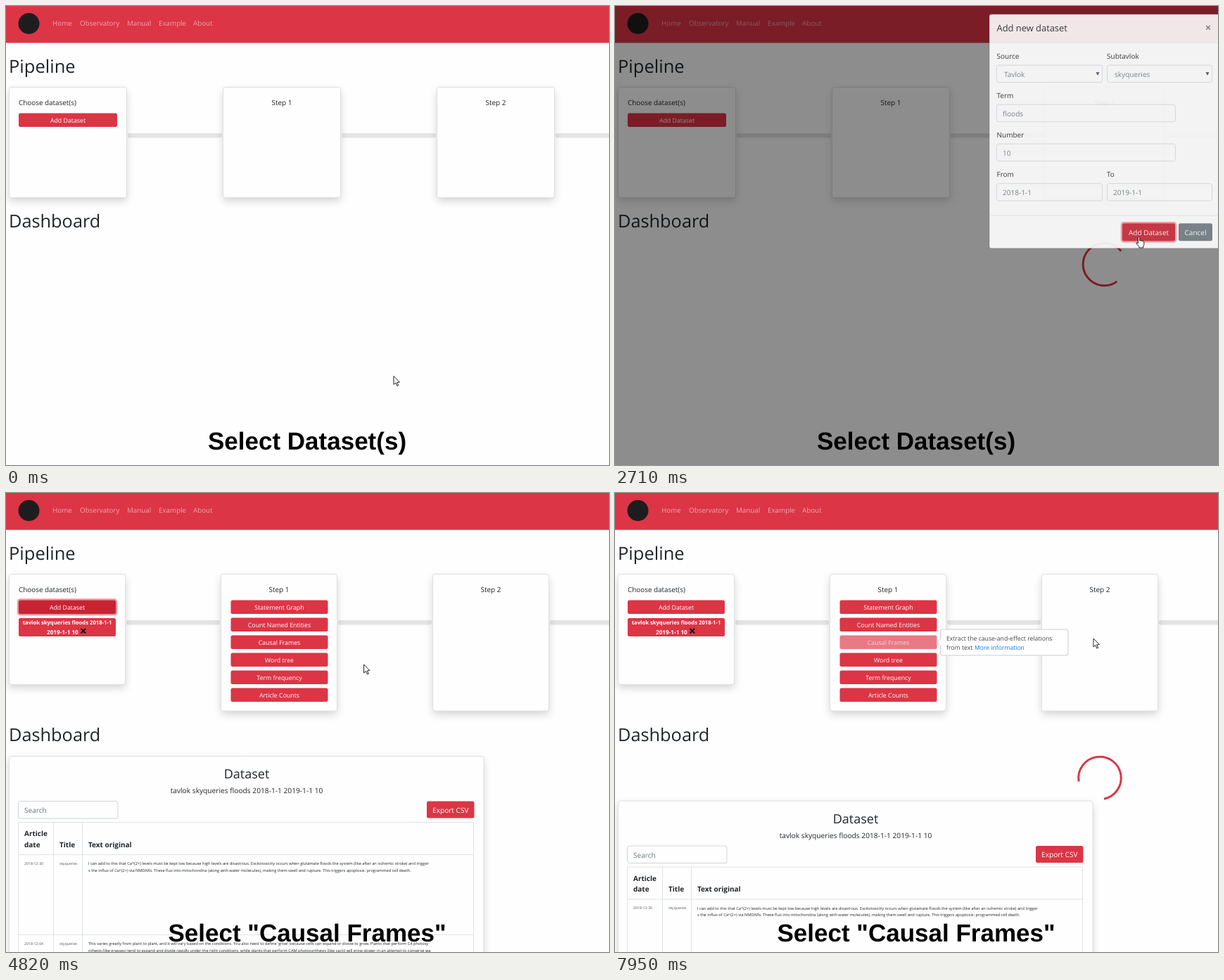
Animation, 857 px wide and 653 px high, one loop 8000 ms. Source, as an HTML page with a canvas:

```html
<!DOCTYPE html>
<html lang="en">
<head>
<meta charset="utf-8">
<title>Pipeline demo</title>
<style>
  html, body { margin: 0; width: 100%; height: 100%; overflow: hidden; background: #fefefe; }
  canvas { display: block; }
</style>
</head>
<body>
<canvas id="stage" width="857" height="653"></canvas>
<script>
const ctx = document.getElementById('stage').getContext('2d');
ctx.textRendering = 'geometricPrecision';

const LOOP = 8000;
const RED = '#dc3545', DARK_RED = '#c02231', INK = '#212529', GREY = '#6c757d', LINE = '#dee2e6';
const SANS = '"Open Sans", "Noto Sans", sans-serif';
const QUERY = 'tavlok skyqueries floods 2018-1-1';

// Moments of the story, in ms
const BACKDROP_IN = 1290, MODAL_IN = 1460, SUBMIT = 2570, MODAL_OUT = 2695;
const LOADED = 3850, NEXT_CAPTION = 4510, POPOVER = 5130;
const RUN_CLICK = 5830, ALERT_IN = 5880, ALERT_OUT = 7290, RUNNING = 7330;

const progress = (t, start, length) => Math.min(1, Math.max(0, (t - start) / length));
const smooth = u => u * u * (3 - 2 * u);
const easeOut = u => 1 - (1 - u) ** 2;

function text(str, x, y, size, color = INK, align = 'left', weight = 400, family = SANS) {
  ctx.font = `${weight} ${size}px ${family}`;
  ctx.fillStyle = color;
  ctx.textAlign = align;
  ctx.fillText(str, x, y);
}

function box(x, y, w, h, { fill, stroke, r = 3, shadow = 0, lineWidth = 1 } = {}) {
  ctx.save();
  ctx.beginPath();
  ctx.roundRect(x, y, w, h, r);
  if (shadow) {
    ctx.shadowColor = `rgba(0,0,0,${shadow})`;
    ctx.shadowBlur = 12;
    ctx.shadowOffsetY = 5;
  }
  if (fill) { ctx.fillStyle = fill; ctx.fill(); }
  ctx.shadowColor = 'transparent';
  if (stroke) { ctx.strokeStyle = stroke; ctx.lineWidth = lineWidth; ctx.stroke(); }
  ctx.restore();
}

function line(x1, y1, x2, y2, color = LINE, width = 1) {
  ctx.beginPath();
  ctx.moveTo(x1, y1);
  ctx.lineTo(x2, y2);
  ctx.strokeStyle = color;
  ctx.lineWidth = width;
  ctx.stroke();
}

function button(label, x, y, w, h, size, { fill = RED, focus = false } = {}) {
  if (focus) box(x - 1, y - 1, w + 2, h + 2, { stroke: 'rgba(220,53,69,.5)', lineWidth: 2.5 });
  box(x, y, w, h, { fill, r: 2.5 });
  text(label, x + w / 2, y + h / 2 + size * .4, size, '#fff', 'center');
}

const card = (x, y, w, h) => box(x, y, w, h, { fill: '#fefefe', stroke: '#dfdfdf', shadow: .17 });

function spinner(x, y, gapCentre) {
  ctx.beginPath();
  ctx.arc(x, y, 30.3, (gapCentre + 46) * Math.PI / 180, (gapCentre + 314) * Math.PI / 180);
  ctx.strokeStyle = RED;
  ctx.lineWidth = 3;
  ctx.stroke();
}

function navbar() {
  ctx.fillStyle = RED;
  ctx.fillRect(0, 0, 857, 52.5);
  ctx.beginPath();
  ctx.arc(32.5, 25, 15, 0, 7);
  ctx.fillStyle = '#1d1d1f';
  ctx.fill();
  const links = { Home: 66, Observatory: 105, Manual: 172, Example: 217, About: 266 };
  for (const name in links) text(name, links[name], 28, 9.8, 'rgba(255,255,255,.55)');
}

function pipeline(t) {
  const loaded = t >= LOADED;
  const pitch = loaded ? 301 : 304, width = loaded ? 165 : 167, inner = width - 27;
  text('Pipeline', 4, 95, 25.5);
  for (let i = 0; i < 3; i++) {
    const x = 4.5 + i * pitch;
    box(x + width + 1.5, 181, pitch - width - 3, 6.5, { fill: '#e4e4e4', r: 2 });
    card(x, 115.5, width, loaded && i ? 194.5 : 157);
    if (i) text('Step ' + i, x + width / 2, 141, 10, INK, 'center');
  }
  text('Choose dataset(s)', 18, 141, 9.9);
  const hover = t > 930 && t < BACKDROP_IN;
  const focus = loaded && t < RUN_CLICK;
  button('Add Dataset', 18, 152.5, inner, 19.5, 8.8, { fill: hover || focus ? '#c82333' : RED, focus });
  if (!loaded) return;

  box(18, 178, inner, 26, { fill: RED, r: 2.5 });
  text(QUERY, 87, 186.5, 7.7, '#fff', 'center', 700);
  text('2019-1-1 10', 58, 201, 8.2, '#fff', 'left', 700);
  line(106.5, 193, 113, 199.5, '#000', 1.8);
  line(113, 193, 106.5, 199.5, '#000', 1.8);

  const steps = ['Statement Graph', 'Count Named Entities', 'Causal Frames', 'Word tree', 'Term frequency', 'Article Counts'];
  steps.forEach((label, i) => {
    const chosen = i === 2 && t < RUNNING;
    const focus = chosen && t >= RUN_CLICK;
    const fill = focus ? DARK_RED : chosen && t > 4960 ? '#c82333' : RED;
    if (i === 2 && t >= RUNNING) ctx.globalAlpha = .65;
    button(label, 319.5, 152.5 + i * 25, inner, 19.5, 8.8, { fill, focus });
    ctx.globalAlpha = 1;
  });
}

function tableRow(y, date, lines) {
  text(date, 26, y - .5, 5.2, '#555');
  text('skyqueries', 76, y - .5, 5.1, '#555');
  lines.forEach((s, i) => text(s, 117, y + i * 9.7, 5.65));
}

function datasetCard() {
  card(4.5, 374.5, 674.5, 400);
  text('Dataset', 342, 406, 18, INK, 'center', 500);
  text(QUERY + ' 2019-1-1 10', 342, 427, 10.2, INK, 'center');
  box(17.5, 438.5, 141.5, 24.5, { stroke: '#ced4da' });
  text('Search', 26, 455, 10.1, GREY);
  button('Export CSV', 598, 438.5, 67.5, 24, 10.1);

  for (const x of [17.5, 67.5, 108.5, 664.5]) line(x, 468.5, x, 760);
  for (const y of [468.5, 514.5, 628.5]) line(17.5, y, 664.5, y);
  text('Article', 26, 488, 10, INK, 'left', 700);
  text('date', 26, 503.5, 10, INK, 'left', 700);
  text('Title', 76, 503.5, 10, INK, 'left', 700);
  text('Text original', 117, 503.5, 10, INK, 'left', 700);
  tableRow(529, '2018-12-30', [
    'I can add to this that Ca^(2+) levels must be kept low because high levels are disastrous. Excitotoxicity occurs when glutamate floods the system (like after an ischemic stroke) and trigger',
    's the influx of Ca^(2+) via NMDARs. These flux into mitochondria (along with water molecules), making them swell and rupture. This triggers apoptosis: programmed cell death.']);
  tableRow(643, '2018-12-04', [
    "This varies greatly from plant to plant, and it will vary based on the conditions. You also need to define 'grow' because cells can expand or divide to grow. Plants that perform C4 photosy",
    'nthesis (like grasses) tend to expand and divide rapidly under the right conditions, while plants that perform CAM photosynthesis (like cacti) will grow slower in an attempt to conserve wa']);
}

function dashboard(t) {
  const loaded = t >= LOADED;
  text('Dashboard', 4, loaded ? 352.5 : 315, 25.3);
  if (!loaded && t >= 2640) spinner(695.5, 367.5, 97 + (t - 2860) * .6);
  if (t >= RUNNING) spinner(689, 405.5, 124 + (t - 7950) * .6);
  if (!loaded) return;
  ctx.save();
  if (t >= RUNNING) ctx.translate(0, 63.5);
  datasetCard();
  ctx.restore();
}

function popover(t) {
  ctx.globalAlpha = progress(t, POPOVER, 150);
  box(462.5, 194, 181.5, 37, { fill: '#fff', stroke: '#ccc' });
  ctx.beginPath();
  ctx.moveTo(463, 207);
  ctx.lineTo(457.5, 212.5);
  ctx.lineTo(463, 218);
  ctx.fillStyle = '#fff';
  ctx.fill();
  ctx.strokeStyle = '#ccc';
  ctx.lineWidth = 1;
  ctx.stroke();
  text('Extract the cause-and-effect relations', 471, 209.5, 8.7, '#444');
  text('from text', 471, 223, 8.7, '#444');
  text('More information', 511, 223, 8.6, '#007bff');
  ctx.globalAlpha = 1;
}

function field(value, x, y, w, isSelect) {
  box(x, y, w, 24.5, { stroke: '#ced4da' });
  text(value, x + (isSelect ? 10.5 : 8.5), y + 16.5, 10.1, GREY);
  if (!isSelect) return;
  ctx.beginPath();
  ctx.moveTo(x + w - 9, y + 10);
  ctx.lineTo(x + w - 4, y + 10);
  ctx.lineTo(x + w - 6.5, y + 14.5);
  ctx.fillStyle = '#444';
  ctx.fill();
}

function modal(t) {
  const closing = progress(t, MODAL_OUT, 150);
  ctx.fillStyle = `rgba(0,0,0,${.5 * progress(t, BACKDROP_IN, 150) * (1 - closing)})`;
  ctx.fillRect(0, 0, 857, 653);

  ctx.save();
  ctx.globalAlpha = progress(t, MODAL_IN, 150) * (1 - closing);
  ctx.translate(0, -50 * (1 - easeOut(progress(t, 1385, 350))) - 50 * easeOut(progress(t, 2710, 300)));
  box(532, 12, 330, 333, { fill: '#fff', stroke: 'rgba(0,0,0,.2)' });
  text('Add new dataset', 542.5, 36, 12.9, INK, 'left', 500);
  text('×', 843, 36, 15, '#777', 'center', 700);
  line(532, 52.5, 857, 52.5);
  line(532, 298.5, 857, 298.5);

  text('Source', 542.5, 75, 10);
  text('Subtavlok', 699, 75, 10);
  text('Term', 542.5, 131.5, 10);
  text('Number', 542.5, 187.5, 10);
  text('From', 542.5, 243.5, 10);
  text('To', 699, 243.5, 10);
  field('Tavlok', 542.5, 84.5, 150, true);
  field('skyqueries', 699.5, 84.5, 149, true);
  field('floods', 542.5, 140.5, 254);
  field('10', 542.5, 196.5, 254);
  field('2018-1-1', 542.5, 253, 150);
  field('2019-1-1', 699.5, 253, 149);

  const focus = t >= SUBMIT;
  button('Add Dataset', 721, 309.5, 75, 25, 10, { fill: focus ? DARK_RED : t > 2280 ? '#c82333' : RED, focus });
  button('Cancel', 801, 309.5, 48, 25, 10, { fill: GREY });
  ctx.restore();
}

function alertBox(t) {
  box(531.5, -6, 340, 107, { fill: '#fff', stroke: '#bbb', r: 1, shadow: .4 });
  text('192.168.0.168:3000 says', 544, 16, 10.1, '#333');
  text('This operation can take a while, are you', 544, 36, 9, '#5f5f5f');
  text('sure you want to continue with a dataset of this size?', 564, 50.5, 9, '#5f5f5f');
  box(742, 66, 50, 23.5, { fill: t > 6980 ? '#3277dc' : '#3f87ee', r: 2 });
  text('OK', 767, 81, 8.5, '#fff', 'center', 700);
  box(798.5, 66.5, 49, 22.5, { stroke: '#dadce0', r: 2 });
  text('Cancel', 823, 81, 8.4, '#3f87ee', 'center', 600);
}

const ARROW = new Path2D('M0 0V12L2.8 9.5 4.8 14 6.7 13.2 4.7 8.9 8.4 8.6Z');
const HAND = new Path2D('M3.5 10V1.7Q3.5 .5 4.6 .5T5.7 1.7V6Q6.8 5 7.8 6.2 9 5.4 9.8 6.7 11.5 6.2 12 7.8V11Q11.8 13 10.7 14V16H5V14.5L1 9.8Q.6 8.2 2 8.5Z');

// Pointer moves: start, end, target x, target y
const MOVES = [
  [70, 870, 106, 172], [900, 1000, 103, 170.5], [1720, 2350, 744.5, 328.5],
  [4500, 5000, 411, 209], [6370, 7130, 768, 76], [7300, 7940, 680, 207]
];
const HAND_TIMES = [[930, BACKDROP_IN], [2280, 4540], [4940, 6440]];

function pointer(t) {
  let x = 551, y = 526.5;
  for (const [start, end, toX, toY] of MOVES) {
    const u = smooth(progress(t, start, end - start));
    x += (toX - x) * u;
    y += (toY - y) * u;
  }
  const hand = HAND_TIMES.some(([from, to]) => t >= from && t < to);
  const shape = hand ? HAND : ARROW;
  ctx.save();
  ctx.translate(hand ? x - 4.6 : x, hand ? y - .5 : y);
  ctx.fillStyle = '#fff';
  ctx.fill(shape);
  ctx.strokeStyle = '#222';
  ctx.lineWidth = 1;
  ctx.lineJoin = 'round';
  ctx.stroke(shape);
  ctx.restore();
}

function caption(t) {
  const second = t >= NEXT_CAPTION;
  text(second ? 'Select "Causal Frames"' : 'Select Dataset(s)', 428, second ? 637.5 : 631, 35,
    '#000', 'center', 700, '"Liberation Sans", Arial, sans-serif');
}

function render() {
  const t = performance.now() % LOOP;
  ctx.fillStyle = '#fefefe';
  ctx.fillRect(0, 0, 857, 653);
  navbar();
  pipeline(t);
  dashboard(t);
  if (t >= POPOVER) popover(t);
  if (t >= BACKDROP_IN && t < MODAL_OUT + 150) modal(t);
  if (t >= ALERT_IN && t < ALERT_OUT) alertBox(t);
  caption(t);
  pointer(t);
  requestAnimationFrame(render);
}
render();
</script>
</body>
</html>
```
